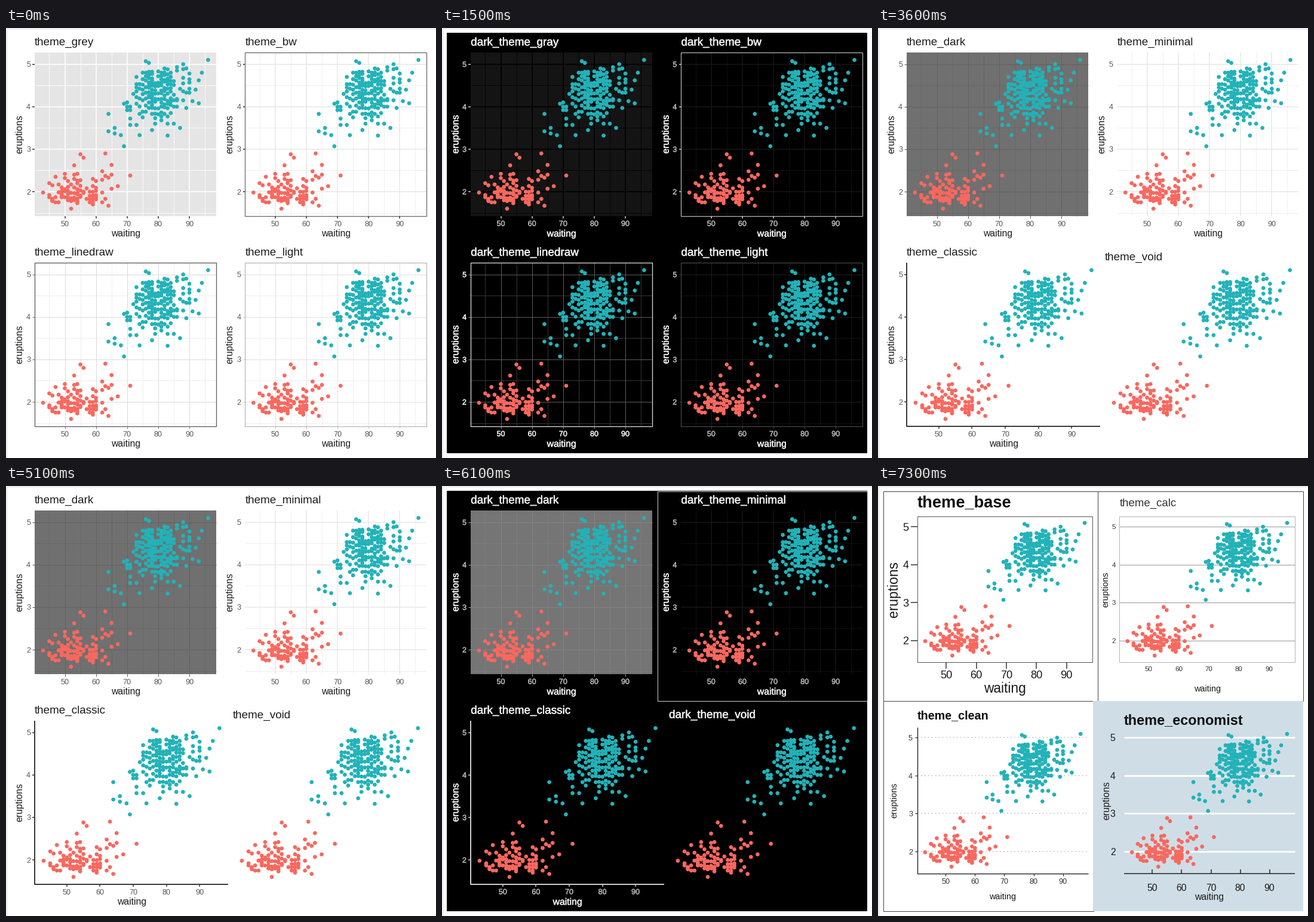
Animation, 720 px wide and 720 px high, one loop 8 s. Source, as a matplotlib script:

```python
import itertools

import matplotlib.pyplot as plt
import numpy as np
from matplotlib.animation import FuncAnimation
from matplotlib.collections import LineCollection
from matplotlib.patches import Rectangle
from matplotlib.patheffects import withStroke

SIZE, DPI = 720, 100
PT = 72 / DPI  # points per pixel
FRAMES, STEP = 80, 100
CUTS = (15, 36, 52, 69)  # ticks at which the next slide appears
RED, TEAL = "#f8685f", "#22b2b8"

plt.rcParams["font.family"] = "Liberation Sans"
fig = plt.figure(figsize=(SIZE / DPI, SIZE / DPI), dpi=DPI, facecolor="white")
ax = fig.add_axes([0, 0, 1, 1])
ax.set_xlim(0, SIZE)
ax.set_ylim(SIZE, 0)
ax.axis("off")
order = itertools.count(1)


# ---- data: waiting time against eruption length ----

LONE = [
    (64, 3.83), (64, 3.42), (66, 3.5), (66, 3.37), (68, 3.33), (69, 3.07),
    (69, 4.07), (70, 4.1), (70, 4.0), (70, 3.92), (71, 4.0), (71, 3.92),
    (71, 3.72), (71, 3.57), (73, 3.57), (74, 3.33), (78, 3.45), (83, 3.32),
    (83, 3.6), (85, 3.6), (79, 3.6), (81, 3.68), (87, 3.5), (87, 4.42),
    (96, 5.1), (94, 4.8), (93, 4.62), (93, 4.08), (92, 4.4), (91, 4.13),
    (89, 4.9), (89, 4.33), (89, 3.97), (86, 4.93), (86, 4.85), (86, 4.0),
    (76, 5.07), (77, 5.03), (72, 4.3), (73, 4.7), (71, 2.38), (67, 2.13),
    (65, 2.63), (65, 2.4), (65, 2.07), (64, 2.33), (64, 1.67), (63, 2.9),
    (63, 2.37), (63, 1.83), (62, 2.48), (62, 2.28), (62, 1.98), (62, 1.75),
    (55, 2.88), (56, 2.8), (53, 2.62), (52, 1.6), (43, 1.98), (47, 2.35),
    (45, 2.2), (46, 2.15), (50, 2.42),
]
# waiting, count, shortest, longest
SHORT = [
    (45, 2, 1.87, 1.92), (46, 3, 1.78, 1.83), (47, 2, 1.75, 1.87),
    (48, 3, 1.75, 2.17), (49, 5, 1.87, 2.1), (50, 4, 1.87, 2.32),
    (51, 6, 1.8, 2.25), (52, 4, 1.78, 2.17), (53, 6, 1.8, 2.4),
    (54, 9, 1.73, 2.42), (55, 5, 1.88, 2.27), (56, 2, 1.97, 2.0),
    (57, 2, 1.83, 2.08), (58, 4, 1.75, 2.0), (59, 7, 1.7, 2.3),
    (60, 6, 1.82, 2.25),
]
LONG = [
    (73, 5, 4.07, 4.53), (74, 5, 3.83, 4.53), (75, 8, 3.75, 4.8),
    (76, 8, 3.88, 4.8), (77, 11, 3.97, 4.82), (78, 14, 3.83, 4.82),
    (79, 9, 3.73, 4.55), (80, 8, 3.82, 4.83), (81, 12, 3.77, 4.8),
    (82, 12, 3.83, 4.9), (83, 11, 3.77, 4.88), (84, 10, 3.85, 4.8),
    (85, 5, 4.0, 4.6), (86, 2, 4.15, 4.18), (88, 6, 4.15, 5.0),
    (90, 5, 4.33, 4.78),
]


def fill(columns, power):
    """Spread each column's points between its ends, with some jitter."""
    rng = np.random.default_rng(7)
    for wait, n, low, high in columns:
        t = np.linspace(0, 1, n)
        t[1:-1] += rng.uniform(-0.4, 0.4, n - 2) / (n - 1)
        for u in t ** power:
            yield wait, low + (high - low) * u


DATA = np.array(LONE + list(fill(SHORT, 1.4)) + list(fill(LONG, 0.85)))
HUES = np.where(DATA[:, 1] < 3, RED, TEAL)


# ---- drawing helpers; a box is (left, top, width, height) in pixels ----

def px(box, wait):
    return box[0] + (wait - 40.35) / 58.3 * box[2]


def py(box, length):
    return box[1] + (5.275 - length) / 3.85 * box[3]


class Slide:
    def __init__(self):
        self.parts = []

    def add(self, artist):
        artist.set_zorder(next(order))
        artist.set_visible(False)
        ax.add_artist(artist)
        self.parts.append(artist)

    def show(self, on):
        for part in self.parts:
            part.set_visible(on)

    def rect(self, x, y, w, h, face="none", edge="none", width=1.0):
        self.add(Rectangle((x, y), w, h, fc=face, ec=edge, lw=width * PT))

    def lines(self, segments, color, width, style="solid"):
        self.add(LineCollection(segments, colors=color, linewidths=width * PT,
                                linestyles=[style], capstyle="butt"))

    def text(self, x, y, string, size, color, ha="left", rot=0, bold=False, heavy=False):
        label = plt.Text(x, y, string, fontsize=size * PT, color=color, ha=ha,
                         va="baseline", rotation=rot, rotation_mode="anchor",
                         weight="bold" if bold else "normal")
        if heavy:
            label.set_path_effects([withStroke(linewidth=0.4 * PT, foreground=color)])
        self.add(label)

    def rules(self, box, xs, ys, color, width, style="solid"):
        x, y, w, h = box
        self.lines([[(px(box, v), y), (px(box, v), y + h)] for v in xs]
                   + [[(x, py(box, v)), (x + w, py(box, v))] for v in ys],
                   color, width, style)

    def points(self, box):
        dots = ax.scatter(px(box, DATA[:, 0]), py(box, DATA[:, 1]),
                          s=(6.7 * PT) ** 2, c=HUES, linewidths=0)
        dots.remove()
        self.add(dots)

    def ticks(self, box, size, color, width=1.5, left=True):
        x, y, w, h = box
        marks = [[(px(box, v), y + h), (px(box, v), y + h + size)] for v in range(50, 91, 10)]
        if left:
            marks += [[(x - size, py(box, v)), (x, py(box, v))] for v in range(2, 6)]
        self.lines(marks, color, width)

    def numbers(self, box, size, color, right, base, heavy=False):
        for v in range(50, 91, 10):
            self.text(px(box, v), base, str(v), size, color, "center", heavy=heavy)
        for v in range(2, 6):
            self.text(right, py(box, v) + 0.36 * size, str(v), size, color, "right", heavy=heavy)

    def names(self, box, size, color, left, base, heavy=False):
        x, y, w, h = box
        self.text(x + w / 2, base, "waiting", size, color, "center", heavy=heavy)
        self.text(left, y + h / 2, "eruptions", size, color, "center", 90, heavy=heavy)

    def axes(self, box, color, width):
        x, y, w, h = box
        self.lines([[(x, y), (x, y + h), (x + w, y + h)]], color, width)

    def plot(self, title, box, dark=False, face="none", major=None, minor=None,
             border=None, tick=None, tick_w=1.5, axis=None, label=None):
        """One panel with the usual layout; grids are (color, width)."""
        x, y, w, h = box
        ink = "#f4f4f4" if dark else "#1c1c1c"
        label = label or ("#b3b3b3" if dark else "#555555")
        self.rect(x, y, w, h, face)
        if minor:
            self.rules(box, range(45, 96, 10), (1.5, 2.5, 3.5, 4.5), *minor)
        if major:
            self.rules(box, range(50, 91, 10), range(2, 6), *major)
        self.points(box)
        if border:
            self.rect(x, y, w, h, edge=border, width=1.3)
        if axis:
            self.axes(box, axis, 1.7)
        if tick:
            self.ticks(box, 3.9, tick, tick_w)
        self.text(x, y - 11.7, title, 18.9, ink, heavy=dark)
        self.numbers(box, 12.6, label, x - 7.1, y + h + 16.5, dark)
        self.names(box, 15.75, ink, x - 20.8, y + h + 34.2, dark)

    def void(self, title, dark=False):
        box = (380.2, 393, 324.3, 274)
        self.points(box)
        self.text(380, 388.6, title, 18.9, "#f4f4f4" if dark else "#1c1c1c", heavy=dark)


TOP_L, TOP_R = (48.2, 41, 304, 274), (400.4, 41, 304, 274)
LOW_L, LOW_R = (48.2, 393, 304, 274), (400.4, 393, 304, 274)
WIDE = (48.2, 393, 324, 274)


def light_one():
    s = Slide()
    s.plot("theme_grey", TOP_L, face="#e5e5e5", major=("white", 1.6),
           minor=("white", 0.8), tick="#333333")
    s.plot("theme_bw", TOP_R, major=("#e9e9e9", 1.6), minor=("#ebebeb", 0.8),
           border="#6a6a6a", tick="#333333")
    s.plot("theme_linedraw", LOW_L, major=("#dadada", 1), minor=("#eeeeee", 1),
           border="#5c5c5c", tick="#555555", tick_w=0.8)
    s.plot("theme_light", LOW_R, major=("#dedede", 0.9), minor=("#e9e9e9", 0.7),
           border="#b9b9b9", tick="#b3b3b3", tick_w=0.8)
    return s


def dark_one():
    s = Slide()
    s.rect(8, 8, 704, 704, "black")
    s.plot("dark_theme_gray", TOP_L, True, face="#141414", major=("black", 1.5),
           minor=("black", 0.8), tick="#cccccc")
    s.plot("dark_theme_bw", TOP_R, True, major=("#161616", 1.5), minor=("#141414", 0.8),
           border="#b4b4b4", tick="#cccccc")
    s.plot("dark_theme_linedraw", LOW_L, True, major=("#5c5c5c", 1), minor=("#363636", 1),
           border="#dddddd", tick="#aaaaaa", tick_w=0.8, label="#f0f0f0")
    s.plot("dark_theme_light", LOW_R, True, major=("#212121", 0.9), minor=("#1a1a1a", 0.7),
           border="#444444", tick="#4d4d4d", tick_w=0.8)
    return s


def light_two():
    s = Slide()
    s.plot("theme_dark", TOP_L, face="#707070", major=("#606060", 0.9),
           minor=("#646464", 0.6), tick="#333333", tick_w=0.8)
    s.plot("theme_minimal", TOP_R, major=("#e9e9e9", 1.6), minor=("#ebebeb", 0.8))
    s.plot("theme_classic", WIDE, axis="#1a1a1a", tick="#333333")
    s.void("theme_void")
    return s


def dark_two():
    s = Slide()
    s.rect(8, 8, 704, 704, "black")
    s.rect(360.5, 8.5, 351, 351, edge="#d0d0d0")
    s.plot("dark_theme_dark", TOP_L, True, face="#757575", major=("#868686", 0.9),
           minor=("#828282", 0.6), tick="#cccccc", tick_w=0.8)
    s.plot("dark_theme_minimal", TOP_R, True, major=("#161616", 1.5), minor=("#141414", 0.8))
    s.plot("dark_theme_classic", WIDE, True, axis="#f0f0f0", tick="#cccccc")
    s.void("dark_theme_void", True)
    return s


def extra():
    s = Slide()
    ink = "#1a1a1a"
    s.rect(8.5, 8.5, 359, 351, edge="#444444")
    s.rect(367.5, 8.5, 344, 351, edge="#444444")
    s.rect(8.5, 359.5, 352, 352, edge="#444444")
    s.rect(360, 360, 352, 352, "#cfdee6")

    box = (65.8, 50.7, 293.6, 244.3)
    s.points(box)
    s.rect(*box, edge="#555555")
    s.ticks(box, 11, "#333333")
    s.text(66, 36.3, "theme_base", 27.3, "#111111", bold=True)
    s.numbers(box, 18.3, ink, 51.5, 322.3)
    s.names(box, 22.8, ink, 33.3, 346)

    box = (404.4, 50.7, 294, 244.3)
    s.rules(box, (), range(2, 6), "#b0b0b0", 1.4)
    s.points(box)
    s.rect(*box, edge="#b3b3b3")
    s.text(404.4, 34.3, "theme_calc", 18.6, "#333333")
    s.numbers(box, 11.5, "#333333", 398, 310.2)
    s.names(box, 14.4, ink, 385, 344)

    box = (65.8, 404, 286.4, 244.5)
    s.rules(box, (), range(2, 6), "#b4b4b4", 1.5, (0, (1, 3)))
    s.points(box)
    s.axes(box, "#222222", 1.4)
    s.ticks(box, 4, "#333333", 1.3)
    s.text(65.8, 390.2, "theme_clean", 19.8, "#111111", bold=True)
    s.numbers(box, 12.6, "#333333", 58, 665.5)
    s.names(box, 14.4, ink, 31.3, 692.3)

    box = (412.2, 404, 285.7, 244.5)
    s.rules(box, (), range(2, 6), "white", 2.7)
    s.points(box)
    x, y, w, h = box
    s.lines([[(x, y + h), (x + w, y + h)]], "#222222", 1.5)
    s.ticks(box, -7, "#222222", left=False)
    s.text(412.2, 399, "theme_economist", 23.5, "#111111", bold=True)
    s.numbers(box, 15.75, ink, 397.5, 678)
    s.names(box, 15.75, ink, 387.5, 692.5)
    return s


ax.add_patch(Rectangle((0.5, 0.5), SIZE - 1, SIZE - 1, fc="none", ec="#dcdcdc", lw=PT))
slides = [light_one(), dark_one(), light_two(), dark_two(), extra()]


def update(i):
    current = sum(i >= cut for cut in CUTS)
    for k, slide in enumerate(slides):
        slide.show(k == current)
    return []


anim = FuncAnimation(fig, update, frames=FRAMES, init_func=lambda: update(0),
                     interval=STEP, repeat=True, repeat_delay=0, blit=False)
plt.show()
```
